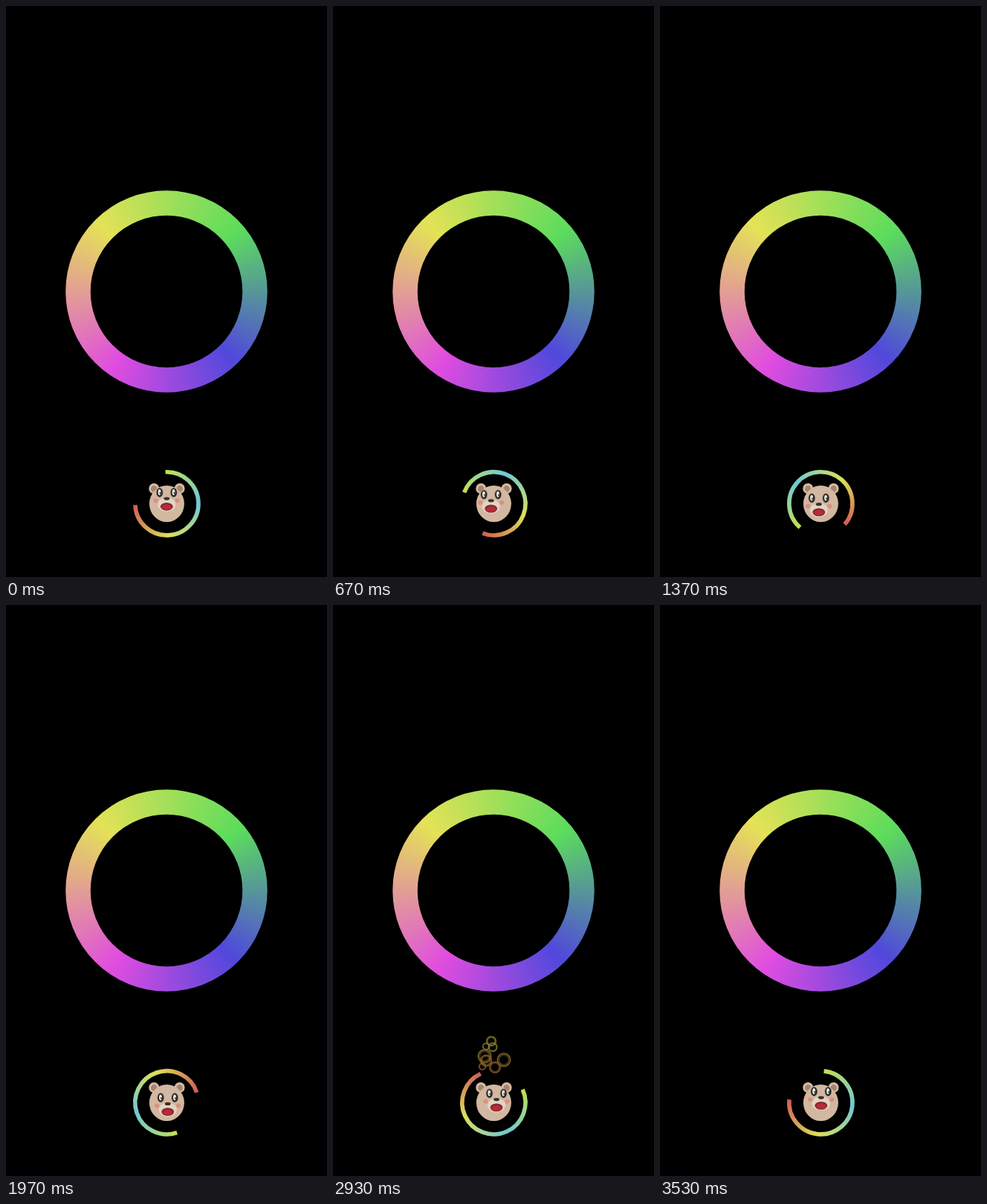
Animation of 432x768 px, one loop 3.56 s. Source, as an HTML page with a canvas:

```html
<!DOCTYPE html>
<html lang="en">
<head>
<meta charset="utf-8">
<title>Ring and bear</title>
<style>
html, body { margin: 0; width: 100%; height: 100%; overflow: hidden; background: #000; }
canvas { display: block; width: 432px; height: 768px; }
</style>
</head>
<body>
<canvas id="stage" width="432" height="768"></canvas>
<script>
const ctx = document.getElementById('stage').getContext('2d');
const LOOP = 3560;
const TAU = Math.PI * 2;
const rad = deg => deg * Math.PI / 180;

const RING = { x: 216, y: 384, r: 119, width: 33.5 };
const BEAR = { x: 216.4, y: 669.3 };

// Colour stops as [degrees, colour], clockwise from the gradient's start.
const ringStops = [
  [0, '#5048dc'], [80, '#e04ce0'], [180, '#e4e256'], [275, '#5cdc5c'], [360, '#5048dc']
];
const arcStops = [
  [0, '#c4e052'], [20, '#c4e052'], [110, '#70c8d4'],
  [200, '#dce058'], [290, '#d05c54'], [320, '#d05c54']
];

// x, rise and radius at the anchor time, then x and rise one span later.
const bubbles = [
  [213, 53, 7, 212, 229], [206, 46, 5, 211, 214], [215, 45, 6.5, 213, 256],
  [204, 33, 9.5, 204, 158], [206, 27, 8, 206, 193], [230, 28, 9.5, 225, 174],
  [218, 18, 8, 221, 132], [201, 19, 5, 209, 142],
  [219.5, 20, 6.5, 219, 137, 3300, 230]
];

function conic(x, y, start, stops) {
  const gradient = ctx.createConicGradient(start, x, y);
  for (const [deg, colour] of stops) gradient.addColorStop(deg / 360, colour);
  return gradient;
}

function ellipse(x, y, rx, ry, fill) {
  ctx.fillStyle = fill;
  ctx.beginPath();
  ctx.ellipse(x, y, rx, ry, 0, 0, TAU);
  ctx.fill();
}

function strokeArc(x, y, r, width, style, from = 0, to = TAU) {
  ctx.strokeStyle = style;
  ctx.lineWidth = width;
  ctx.beginPath();
  ctx.arc(x, y, r, from, to);
  ctx.stroke();
}

function drawBubble(t, [x0, rise0, r, x1, rise1, at = 2930, span = 370]) {
  const u = (t - at) / span;
  const growth = 1 + (Math.sqrt(rise1 / rise0) - 1) * u;
  if (growth <= 0) return;
  const rise = rise0 * growth * growth;
  if (rise < 10 || rise > 246) return;
  const x = x0 + (x1 - x0) * u;
  const y = 640 - rise;
  const hue = Math.min(155, 18 + rise * 0.7);
  const tint = alpha => `hsla(${hue}, 52%, 36%, ${alpha})`;

  strokeArc(x, y, r * 0.8, r * 0.4, tint(0.5));
  strokeArc(x, y, r - 0.7, 1.3, tint(0.8));
}

function drawRing(t) {
  const phase = (t - 3120) / 360;
  const dip = phase > 0 && phase < 1 ? Math.sin(Math.PI * phase) ** 2 : 0;
  const scale = 1 - 0.073 * dip;
  strokeArc(RING.x, RING.y, RING.r * scale, RING.width * scale,
    conic(RING.x, RING.y, rad(45), ringStops));
}

function drawArc(angle) {
  strokeArc(BEAR.x, BEAR.y, 42.6, 5.6,
    conic(BEAR.x, BEAR.y, angle - rad(20), arcStops), angle, angle + rad(270));
}

function drawEye(x, y) {
  ellipse(x, y, 4.8, 6.6, '#8c837a');
  ellipse(x, y, 4, 5.9, '#24211f');
  ellipse(x - 0.2, y - 0.3, 2, 3.9, '#f0ece4');
  ellipse(x + 0.7, y + 0.8, 0.8, 1.6, '#34302c');
}

function drawBear(angle) {
  const { x, y } = BEAR;
  for (const side of [-1, 1]) {
    ellipse(x + side * 17.2, y - 20.3, 7, 7, '#d4bca4');
    ellipse(x + side * 17.2, y - 19.8, 4.2, 4.4, '#a88470');
  }
  ellipse(x, y + 0.2, 23.5, 24.5, '#d2b8a0');

  ctx.save();
  ctx.beginPath();
  ctx.ellipse(x, y + 0.2, 23.5, 24.5, 0, 0, TAU);
  ctx.clip();
  ctx.translate(x + 4 * Math.cos(angle), y + 4.3 * Math.sin(angle));
  ellipse(0, 5.5, 12, 9.5, '#e2d4c4');
  for (const side of [-1, 1]) {
    ellipse(side * 14.5, 0.2, 3.2, 3, '#dc9080');
    drawEye(side * 9.5, -10.7);
  }
  ellipse(0, -2.4, 4, 2.1, '#38302c');
  ellipse(0, 8.3, 8.4, 5.4, '#8c2430');
  ellipse(0, 9, 6.6, 3.7, '#b42c38');
  ctx.restore();
}

function draw(now) {
  const t = now % LOOP;
  const angle = rad(-92.3 - t * 0.0997);
  ctx.fillStyle = '#000';
  ctx.fillRect(0, 0, 432, 768);
  for (const bubble of bubbles) drawBubble(t, bubble);
  drawRing(t);
  drawArc(angle);
  drawBear(angle);
}

const begin = performance.now();
function tick() {
  draw(performance.now() - begin);
  requestAnimationFrame(tick);
}
tick();
</script>
</body>
</html>
```
